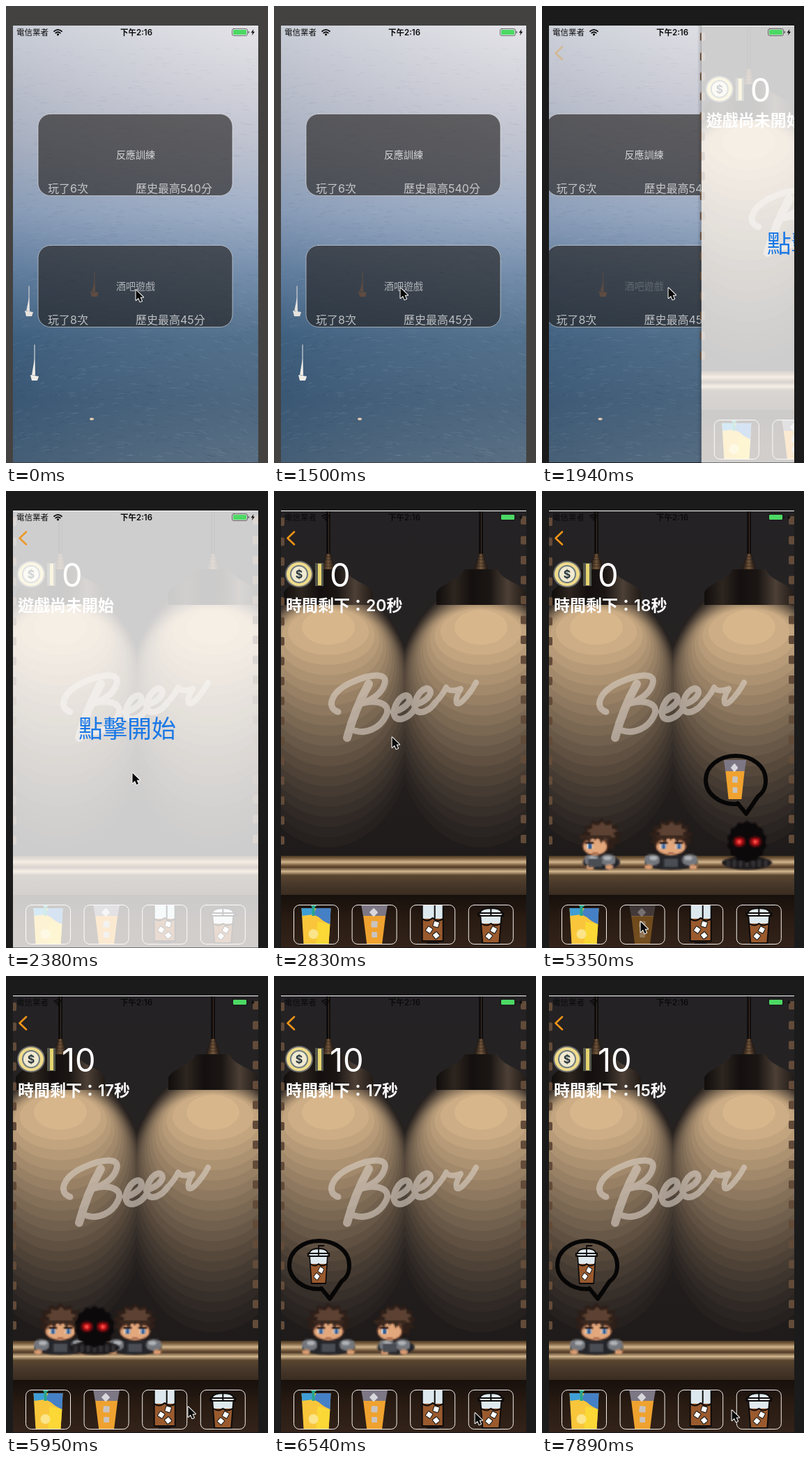
These frames come from a looping animation (376x654 px, 8 s). An HTML page with a canvas:

```html
<!DOCTYPE html>
<html lang="zh-Hant">
<head>
<meta charset="utf-8">
<title>酒吧遊戲</title>
<style>
html, body { margin: 0; width: 100%; height: 100%; overflow: hidden; background: #1b1b1b }
canvas { display: block }
</style>
</head>
<body>
<canvas id="stage" width="376" height="654"></canvas>
<script>
const LOOP = 8000, STEP = 148.4, W = 376, H = 654;
const TAP_MENU = 1785, TAP_START = 2670, SERVED = 5480;
const FONT = 'Inter, "Noto Sans CJK TC", "Noto Sans CJK JP", sans-serif';
const main = document.getElementById('stage').getContext('2d');
let c = main;

// Drawing helpers
const clamp = v => Math.max(0, Math.min(1, v));
const mix = (a, b, f) => a + (b - a) * f;
function rect(fill, x, y, w, h) { c.fillStyle = fill; c.fillRect(x, y, w, h); }
function ellipse(fill, x, y, rx, ry = rx) {
  c.beginPath(); c.ellipse(x, y, rx, ry, 0, 0, 7); c.fillStyle = fill; c.fill();
}
function fill(color, d) { c.fillStyle = color; c.fill(new Path2D(d)); }
function stroke(color, width, d) {
  c.strokeStyle = color; c.lineWidth = width; c.lineCap = c.lineJoin = 'round';
  c.stroke(new Path2D(d));
}
function box(x, y, w, h, r, color, line) {
  c.beginPath(); c.roundRect(x, y, w, h, r);
  if (color) { c.fillStyle = color; c.fill(); }
  if (line) { c.strokeStyle = line; c.lineWidth = 1; c.stroke(); }
}
function text(s, x, y, size, color, weight = 400, align = 'left') {
  c.font = `${weight} ${size}px ${FONT}`; c.textAlign = align; c.fillStyle = color;
  c.fillText(s, x, y);
}
function shade(x0, y0, x1, y1, ...colors) {
  const g = c.createLinearGradient(x0, y0, x1, y1);
  colors.forEach((color, i) => g.addColorStop(i / (colors.length - 1), color));
  return g;
}
function at(x, y, draw, sx = 1) {
  c.save(); c.translate(x, y); c.scale(sx, 1); draw(); c.restore();
}
function layer(w, h, draw) {
  const cv = document.createElement('canvas');
  cv.width = w; cv.height = h;
  c = cv.getContext('2d'); draw(); c = main;
  return cv;
}
function randomizer(seed) {
  return () => (seed = seed * 16807 % 2147483647) / 2147483647;
}

// Menu page
function sailboat(x, y, hull, h) {
  stroke(hull, 1, `M${x} ${y}v${-h}`);
  fill(hull, `M${x} ${y - h * .6}l-4 ${h * .5}h5zM${x - 6} ${y - 5}l12 2l-2 6h-8z`);
}
const sea = layer(W, H, () => {
  rect(shade(0, 28, 0, 653, '#e1e2e7', '#cfd0d9', '#b7bdcc', '#97a9c3', '#6885a5', '#456684', '#3f5c77', '#4b647a'), 10, 28, 352, 625);
  rect(shade(10, 0, 361, 0, 'rgba(20,50,90,.12)', 'rgba(255,240,240,.08)'), 10, 28, 352, 625);
  const rnd = randomizer(41);
  for (let i = 0; i < 1800; i++) {
    const x = 10 + rnd() * 350, y = 60 + rnd() * 592, len = 3 + rnd() * 9;
    const tilt = (x - 170) / 90 * (y > 330 ? 1.6 : .6);
    const tone = rnd() > .5 ? '215,228,242' : '15,35,65';
    stroke(`rgba(${tone},${.03 + .07 * y / H})`, 1, `M${x} ${y}q${len / 2} ${tilt - 1} ${len} ${tilt}`);
  }
  sailboat(33, 441, '#e6e2de', 40);
  sailboat(41, 533, '#efece6', 48);
  sailboat(127, 413, '#c99a80', 33);
  ellipse('#e4cdb2', 123, 591, 3, 1.8);
});
function menuCard(y, title, plays, best, alpha) {
  const soft = 'rgba(255,255,255,.68)';
  box(46, y + .5, 279, 117, 18, 'rgba(32,28,26,.62)', 'rgba(255,255,255,.5)');
  text(title, 186, y + 64, 14, `rgba(255,255,255,${alpha})`, 400, 'center');
  text(plays, 60, y + 113, 16, soft);
  text(best, 186, y + 113, 16, soft);
}
function menuPage(pressed) {
  c.drawImage(sea, 0, 0);
  menuCard(154, '反應訓練', '玩了6次', '歷史最高540分', .75);
  menuCard(342, '酒吧遊戲', '玩了8次', '歷史最高45分', pressed ? .2 : .6);
}

// Bar backdrop
const LAMPS = [78, 297];
function lampLight() {
  const bands = 20, dark = [38, 33, 31], light = [216, 182, 140];
  c.save();
  c.beginPath(); c.rect(10, 150, 352, 373); c.clip();
  for (let i = bands; i >= 0; i--) {
    const k = i / bands, f = (1 - k) ** 1.25;
    const color = `rgb(${dark.map((d, j) => mix(d, light[j], f))})`;
    for (const x of LAMPS) ellipse(color, x, 195 + 125 * k, 38 + 90 * Math.sqrt(k), 25 + 165 * k);
  }
  c.restore();
}
function lamp(x) {
  rect('#0f0d0d', x - 3, 29, 6, 62);
  rect('#3d2f25', x, 29, 1, 62);
  for (let i = 0; i < 5; i++) {
    const r = 4 + i * 1.4;
    rect(shade(x - r, 0, x + r, 0, '#1d1511', '#75573a', '#1d1511'), x - r, 90 + i * 4.5, 2 * r, 4);
  }
  const metal = shade(x - 64, 0, x + 64, 0, '#100d0c', '#2d251f', '#14100f', '#1b1614', '#4d4036', '#221b17');
  fill(metal, `M${x - 24} 112h48c5 16 34 20 40 33v18h-128v-18c6 -13 35 -17 40 -33z`);
}
const bar = layer(W, H, () => {
  rect(shade(0, 28, 0, 523, '#242224', '#262222', '#1f1b1a'), 10, 28, 352, 495);
  lampLight();
  LAMPS.forEach(lamp);
  for (let y = 38; y < 515; y += 28.5) {
    box(8, y, 7, 12, 2, '#624b39');
    box(354, y - 2, 9, 12, 2, '#624b39');
  }
  rect(shade(0, 522, 0, 540, '#47331f', '#86694a', '#d2b68d', '#7b5e41', '#3c2a1c'), 10, 522, 352, 18);
  rect(shade(0, 539, 0, 550, '#5f4832', '#d2b68d', '#59442f'), 10, 539, 352, 11);
  rect(shade(0, 550, 0, 578, '#59452f', '#47372a', '#3a2c20'), 10, 550, 352, 28);
  rect(shade(0, 578, 0, 653, '#17100c', '#2a1c13', '#33231a'), 10, 578, 352, 75);
});

// Wall lettering: B, two e's and r
const sign = layer(W, H, () => {
  const ink = '#d8cfc5', e = 'C3 2 17 -9 11 -17C2 -24 -14 -1 -9 11C-4 21 12 13 20 1';
  stroke(ink, 9, 'M92 316C74 310 82 287 111 274C139 261 166 259 158 278C153 292 137 300 126 304C150 297 170 306 160 323C152 339 133 348 116 343');
  stroke(ink, 12, 'M136 276Q116 312 105 353');
  at(182, 311, () => stroke(ink, 9, 'M-11 5' + e));
  at(212, 301, () => stroke(ink, 9, 'M-11 5' + e));
  stroke(ink, 8, 'M232 302Q242 292 247 281Q252 289 268 283C257 301 261 311 272 299Q282 289 290 274');
});

// Drinks, each 56 px tall around its centre
function cup(color, top, bottom, a, b) {
  fill(color, `M${-a} ${top}H${a}L${b} ${bottom}H${-b}Z`);
}
function ice(x, y, s, turn, line = '#111', color = '#fff') {
  at(x, y, () => { c.rotate(turn); box(-s / 2, -s / 2, s, s, 1, color, line); });
}
const drinks = [
  () => {
    cup('#f9c63b', -23, 28, 21, 18);
    fill('#fbd836', 'M2 -4L20 0L18 28H0Z');
    fill('#3f9ed6', 'M-21 -23H-4V-14L-20 -12Z');
    fill('#4580c6', 'M0 -23H21L20 0Q10 -4 4 -10L-4 -14Z');
    ellipse('#fbe489', -4, 14, 7);
    fill('#27a58c', 'M-8 -28H2L-2 -24V-12H-6V-24Z');
  },
  () => {
    cup('#7d7785', -28, -11, 19, 16);
    cup('#efa22f', -12, 28, 16, 11);
    ice(-1, -17, 9, .8, null, '#d8d7dc');
    ice(0, 0, 9, .1, null, '#c9c3bf');
    ice(0, 15, 8, 0, null, '#c9c3bf');
  },
  () => {
    cup('#dde8ee', -28, -6, 15, 15);
    cup('#9a5a2e', -8, 23, 15, 15);
    stroke('#0c0a0a', 2, 'M-15 -28V24H15V-28M-8 27H8M3 -28V-9M-15 -8Q-8 -2 0 -9Q8 -2 15 -8');
    for (let i = 0; i < 3; i++) ice(i % 2 ? -5 : 5, i * 8, 8, .3 + i * .3);
  },
  () => {
    cup('#dfe9ee', -14, 0, 15, 14);
    cup('#9a5a2e', -1, 26, 14, 12);
    fill('#dfe9ee', 'M-16 -14Q-14 -23 0 -23Q14 -23 16 -14Z');
    stroke('#0c0a0a', 2, 'M-15 -11L-12 27H12L15 -11M-16 -16Q-14 -23 0 -23Q14 -23 16 -16M-18 -16H18V-12H-18ZM0 -12V-27H9M-14 -1Q-6 4 0 -1Q6 4 14 -1');
    ice(4, 8, 8, .5);
    ice(-3, 17, 8, .7);
  }
];
function drinkCards(pressed) {
  drinks.forEach((draw, i) => {
    const x = 28.5 + 83.6 * i;
    c.globalAlpha = i === pressed ? .35 : 1;
    at(x + 32, 620, draw);
    c.globalAlpha = 1;
    box(x, 592.5, 64, 56, 8, null, '#f3efec');
  });
}

// Guests are painted small and enlarged for a soft pixel look
function sprite(draw) {
  const k = 2.4, img = layer(38, 33, () => {
    c.scale(1 / k, 1 / k); c.translate(45, 77); draw();
  });
  return x => main.drawImage(img, x - 45, 541 - 77, 38 * k, 33 * k);
}
function spikes(color, x, y, rx, ry, n, depth) {
  c.beginPath();
  for (let i = 0; i < 2 * n; i++) {
    const a = i * Math.PI / n, r = i % 2 ? 1 - depth : 1;
    c.lineTo(x + rx * r * Math.sin(a), y - ry * r * Math.cos(a));
  }
  c.fillStyle = color; c.fill();
}
function person(turned) {
  const sides = turned ? [-.5, .35] : [-1, 1], face = turned ? -9 : 0;
  ellipse('#24252a', 0, -10, turned ? 27 : 38, 11);
  for (const s of sides) {
    ellipse('#74777d', 27 * s, -13, 11, 8);
    ellipse('#b4b7bb', 25 * s, -16, 6, 3);
    ellipse('#d79a70', 32 * s, -3, 6, 4);
  }
  rect('#4a4d53', face - 10, -15, 20, 12);
  spikes('#2e1f19', 0, -47, turned ? 29 : 33, 26, 13, .2);
  spikes('#5d4233', 1, -53, 23, 15, 9, .3);
  ellipse('#5a3424', face, -33, turned ? 19 : 23, 14);
  ellipse('#e3a77c', face, -32, turned ? 17 : 21, 12);
  for (let i = -2; i < 3; i++) fill('#3a281f', `M${face + i * 9 - 6} -48h12l-6 ${i % 2 ? 11 : 7}z`);
  for (const x of turned ? [-17] : [-11, 11]) {
    rect('#2b1a15', x - 6, -39, 12, 3);
    rect('#f3eee9', x - 4, -36, 8, 7);
    rect('#2a5590', x - 2, -36, 5, 7);
  }
  rect('#a5644a', face - 4, -24, 8, 2);
}
const front = sprite(() => person(false));
const side = sprite(() => person(true));
const hood = sprite(() => {
  ellipse('#1d1a1c', 0, -9, 36, 10);
  for (let i = -3; i < 4; i++) ellipse('#343134', i * 9, -8, 3, 6);
  spikes('#0c090b', 0, -39, 29, 30, 14, .1);
  for (const x of [-11, 12]) {
    ellipse('#5c0b0e', x, -39, 9, 8);
    ellipse('#c8161a', x, -39, 6, 5);
    ellipse('#ff5a50', x, -39, 2.5);
  }
});
function bubble(x, drink) {
  at(x, 413, () => {
    stroke('#070606', 6, 'M1 35C-24 36 -43 19 -43 1C-43 -19 -24 -34 0 -34C24 -34 43 -19 43 1C43 13 39 19 32 24L15 49L3 34Z');
    at(-1, 0, drinks[drink], .85);
  });
}
function guests(t) {
  const enter = 2850;
  if (t < enter) return;
  const walk = (seat, arrive) => mix(392, seat, clamp((t - enter) / (arrive - enter)));
  const leave = (from, speed) => Math.max(0, t - from) * speed;
  (t > 4807 && t < 6496 ? front : side)(walk(185, 4807) - leave(6496, .24));
  (t > 5409 ? front : side)(walk(78, 5409));
  hood(walk(294, 4020) - leave(SERVED, .36));
  if (t > 4600 && t < SERVED) bubble(278, 1);
  if (t > 5950) bubble(65, 3);
}

// Bar page
function coins() {
  ellipse('#6f7170', 36, 119, 20, 19);
  ellipse('#efdb8b', 36, 119, 18, 17);
  ellipse('#6d7a80', 36, 119, 13);
  ellipse('#f1ead0', 36, 119, 11);
  text('$', 36, 125, 16, '#2c3840', 700, 'center');
  rect('#55584c', 59, 103, 12, 33);
  rect('#e6d470', 63, 104, 5, 31);
}
function labels(score, message) {
  text(score, 80, 136.5, 47, '#fff');
  text(message, 17, 172, 23, '#fff', 600);
}
function barPage(t) {
  c.drawImage(bar, 0, 0);
  c.globalAlpha = .62; c.drawImage(sign, 0, 0); c.globalAlpha = 1;
  coins();
  drinkCards(t > 5300 && t < SERVED ? 1 : -1);
  if (t > TAP_START) {
    const seconds = Math.min(20, 20 - Math.floor((t - 2700) / 1000));
    labels(t > SERVED ? '10' : '0', `時間剩下：${seconds}秒`);
    guests(t);
  } else {
    rect('rgba(255,255,255,.78)', 10, 28, 352, 626);
    labels('0', '遊戲尚未開始');
    text('點擊開始', 174, 353, 35, '#1a78e6', 400, 'center');
  }
  rect('#fff', 10, 28, 352, 1);
}

function statusBar() {
  const ink = '#0b0b0c', soft = 'rgba(20,20,20,.55)';
  text('電信業者', 15, 42, 11.5, ink, 500);
  text('下午2:16', 187, 42, 11.5, ink, 600, 'center');
  stroke(ink, 1.8, 'M69 36.2Q74.5 31.6 80 36.2M71.2 38.6Q74.5 35.8 77.8 38.6');
  ellipse(ink, 74.5, 40.8, 1.6);
  box(324.5, 32.5, 22, 10, 2.5, null, soft);
  box(326, 34, 19, 7, 1.2, '#4cd964');
  rect(soft, 347.5, 36, 1.5, 3);
  fill(ink, 'M355.5 33l-4 5.3h2.5l-1.2 4l4.2 -5.5h-2.5z');
}

// Pointer path: time, x, y
const path = [[0, 186, 406], [1488, 186, 406], [1490, 181, 403], [2250, 181, 403], [2600, 169, 352],
  [3000, 169, 352], [4020, 330, 520], [4320, 323, 580], [5150, 141, 616], [5500, 141, 616],
  [6200, 330, 616], [6538, 288, 625], [7500, 272, 630], [7870, 272, 621], [LOOP, 272, 621]];
function pointer(t) {
  const i = path.findIndex(k => k[0] > t);
  const [t0, x0, y0] = path[i - 1], [t1, x1, y1] = path[i], f = (t - t0) / (t1 - t0);
  at(mix(x0, x1, f), mix(y0, y1, f), () => {
    const d = 'M.5 .5V15L4 11.8L6.4 17.2L9 16L6.6 10.8H11Z';
    stroke('#fff', 2, d);
    fill('#0a0a0a', d);
  });
}

function draw(t) {
  const x = clamp((t - TAP_MENU) / 365), push = x * x * (3 - 2 * x);
  rect(t > TAP_MENU ? '#1b1b1b' : '#434241', 0, 0, W, H);
  c.save();
  c.beginPath(); c.rect(10, 28, 352, 625.5); c.clip();
  if (push < 1) at(-105 * push, 0, () => menuPage(t > TAP_MENU));
  if (push > 0) {
    const dx = 351 * (1 - push);
    rect(shade(dx + 4, 0, dx + 10, 0, 'rgba(0,0,0,0)', 'rgba(0,0,0,.18)'), dx + 4, 28, 6, 626);
    at(dx, 0, () => barPage(t));
    stroke(`rgba(240,148,24,${t > TAP_START ? 1 : push * .9})`, 2.6, 'M29 58.5L19.5 67.5L29 76.5');
  }
  c.restore();
  statusBar();
  pointer(t);
}

const begin = performance.now();
function tick() {
  const t = (performance.now() - begin) % LOOP;
  draw(Math.max(0, Math.floor((t - 8) / STEP) * STEP + 8));
  requestAnimationFrame(tick);
}
tick();
</script>
</body>
</html>
```
